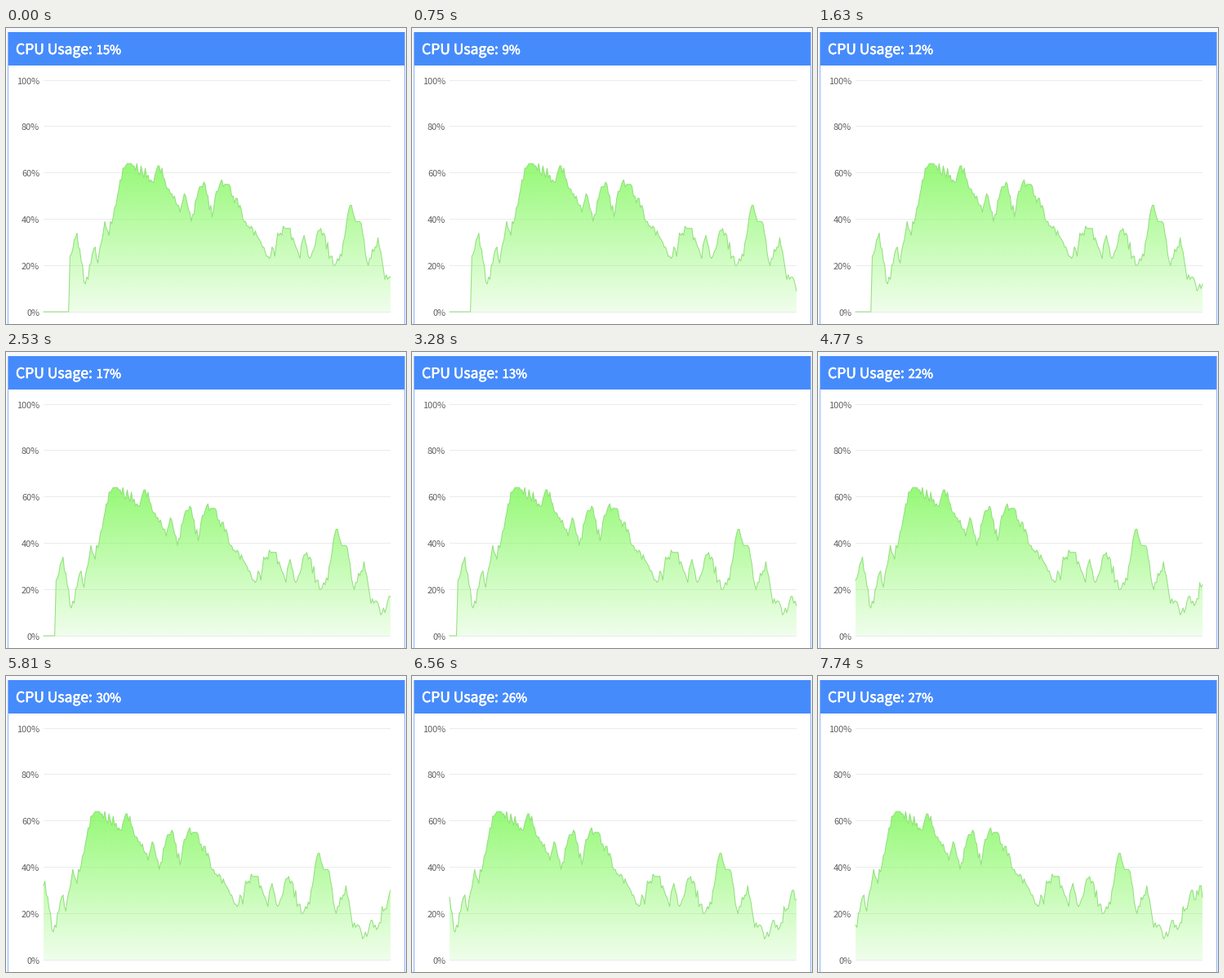
Animation of 490x363 px, one loop 8 s. Source, as a matplotlib script:

```python
import numpy as np
import matplotlib.pyplot as plt
from matplotlib.animation import FuncAnimation
from matplotlib.patches import Polygon, Rectangle
from matplotlib.patheffects import withStroke

W, H, DPI = 490, 363, 100
LOOP, STEP = 8000, 40
PX = 72 / DPI
LEFT, RIGHT, TOP, BASE = 46, 471, 64, 348
WINDOW, ARRIVALS = 250, 31
PEAK = 64
FONT = "Noto Sans CJK JP"

# main turns of the load: (sample, percent)
KEYS = [
    (18, 0), (19, 24), (24, 34), (30, 12), (37, 28), (39, 21), (44, 39), (47, 33),
    (57, 62), (63, PEAK), (77, 57), (83, 63), (98, 43), (101, 51), (106, 39),
    (112, 54), (116, 55), (121, 41), (126, 54), (131, 55), (139, 49), (143, 40),
    (153, 33), (162, 23), (170, 34), (176, 36), (184, 23), (187, 33), (191, 23),
    (199, 36), (209, 20), (214, 24), (219, 44), (228, 38), (233, 20), (240, 32),
    (245, 14), (249, 15), (252, 9), (256, 12), (258, 17), (262, 13), (268, 22),
    (272, 30), (275, 26), (279, 32), (280, 27),
]


def build_samples():
    """Straight runs between the turns, with a little jitter on the way."""
    at, load = np.array(KEYS).T
    idx = np.arange(WINDOW + ARRIVALS)
    jitter = np.random.default_rng(4).normal(0, 1.4, idx.size)
    jitter[at] = 0
    jitter[:at[0]] = 0
    return np.clip(np.round(np.interp(idx, at, load) + jitter), 0, PEAK)


def arrived(ms):
    """Number of samples that have come in; one arrives every 1.7 ticks."""
    times = 149 * np.floor(1.7 * np.arange(ARRIVALS) + 1.75)
    return np.searchsorted(times, ms, side="right")


def to_y(pct):
    return BASE - (BASE - TOP) * pct / 100


samples = build_samples()
xs = np.linspace(LEFT, RIGHT, WINDOW)

fig = plt.figure(figsize=(W / DPI, H / DPI), dpi=DPI, facecolor="white")
ax = fig.add_axes([0, 0, 1, 1])


def label(x, y, text, size, color, ha="left"):
    return ax.text(x, y, text, fontsize=size * PX, color=color, ha=ha,
                   va="baseline", family=FONT, zorder=6)


def title(x, text, size):
    t = label(x, 32, text, size, "white")
    t.set_path_effects([withStroke(linewidth=0.4, foreground="white")])
    return t


def box(x, y, w, h, color):
    ax.add_patch(Rectangle((x, y), w, h, fc=color, ec="none", lw=0))


# card
box(0, 0, W, H, "#f5f8fd")
box(2, 5, 487, 358, "#8fb6f8")
box(3, 5, 485, 358, "white")
box(3, 5, 485, 41, "#468bfc")
title(12, "CPU Usage:", 17.5)
reading = title(110.5, "", 15)

# axis
for pct in range(0, 101, 20):
    row = np.floor(to_y(pct))
    box(LEFT, row, RIGHT - LEFT, 1, "#ebebeb")
    label(41, row + 5, f"{pct}%", 11, "#606060", "right")

# area with a fading fill
fade = np.empty((182, 1, 4))
fade[..., :3] = np.array([126, 248, 88]) / 255
fade[..., 3] = np.linspace(0.81, 0.12, 182)[:, None]
fill = ax.imshow(fade, extent=(LEFT, RIGHT, BASE, to_y(PEAK)),
                 aspect="auto", interpolation="bilinear", zorder=3)
area = Polygon([(0, 0), (1, 0), (0, 1)], fc="none", ec="none")
ax.add_patch(area)
line, = ax.plot([], [], color="#8fe07a", lw=PX, zorder=4, solid_joinstyle="round")

ax.set_xlim(0, W)
ax.set_ylim(H, 0)
ax.axis("off")


def draw(k):
    n = arrived((k + 1) * STEP - 1)
    vals = samples[n:n + WINDOW]
    ys = to_y(vals)
    line.set_data(xs, ys)
    corners = [(RIGHT, BASE), (LEFT, BASE)]
    area.set_xy(np.vstack([np.column_stack([xs, ys]), corners]))
    fill.set_clip_path(area)
    reading.set_text(f"{vals[-1]:.0f}%")
    return fill, line, reading


anim = FuncAnimation(fig, draw, frames=LOOP // STEP, interval=STEP,
                     repeat=True, repeat_delay=0, blit=False)
plt.show()
```
